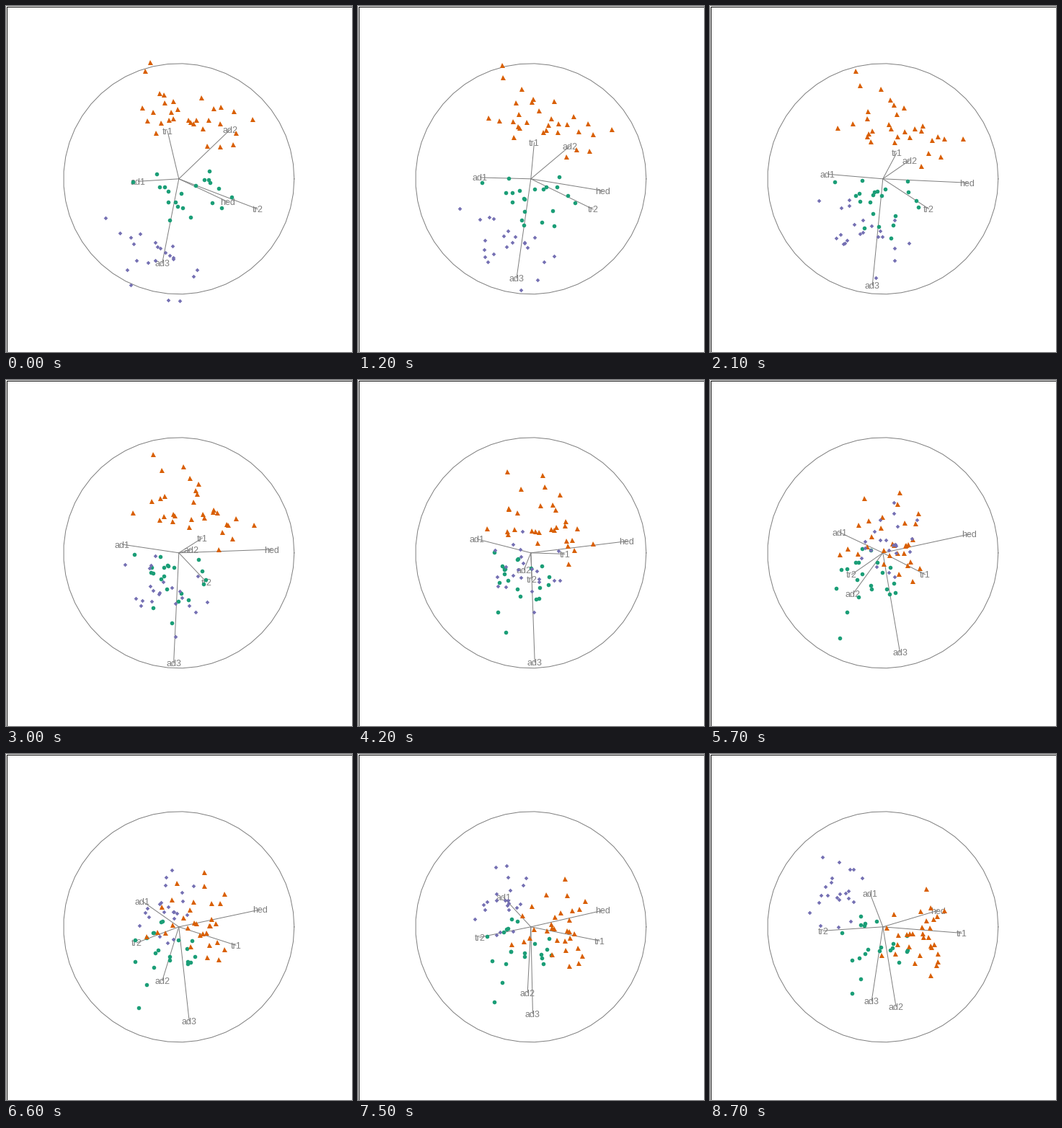
Animation, 480 px wide and 480 px high, one loop 9 s. Source, as a matplotlib script:

```python
import matplotlib.pyplot as plt
import numpy as np
from matplotlib.animation import FuncAnimation

SIZE, DPI = 480, 100
MID, RADIUS = 239.8, 160
UNIT = 230                      # pixels per unit of rescaled data
FRAMES, STEP = 30, 300
TURN = 19                       # the tour heads for a new plane here
PX = 72 / DPI
GREY = "#7f7f7f"
NAMES = ["tr1", "tr2", "hed", "ad1", "ad2", "ad3"]

# The tour's three planes: weights of each variable on x, then on y
START = [[-.10, .68, .42, -.35, .44, -.14], [.415, -.265, -.20, -.02, .425, -.73]]
MIDDLE = [[.365, -.27, .75, -.375, -.26, .144], [-.19, -.19, .165, .18, -.36, -.875]]
END = [[.68, -.515, .475, -.11, .11, -.10], [-.06, -.03, .14, .295, -.70, -.65]]

# Each species: count, colour, marker, size in pixels, mean of each variable
SPECIES = [
    (21, "#1b9e77", "o", 5.6, [.05, .14, .05, .28, .14, .16]),
    (31, "#d95f02", "^", 7.0, [.20, -.12, -.10, -.25, .17, -.24]),
    (22, "#7570b3", "D", 4.0, [-.33, .03, .08, .085, -.40, .19]),
]
SPREAD = [.10, .17, .16, .12, .12, .12]
CORR = 0.4

rng = np.random.default_rng(6)


def orthonormal(rows):
    u, _, vt = np.linalg.svd(rows, full_matrices=False)
    return u @ vt


def geodesic(a, b):
    """Constant-speed path of planes from a (t = 0) to b (t = 1)."""
    a, b = orthonormal(a), orthonormal(b)
    u, cosines, vt = np.linalg.svd(a @ b.T)
    angles = np.arccos(np.clip(cosines, -1, 1))[:, None]
    first, last = u.T @ a, vt @ b
    side = (last - np.cos(angles) * first) / np.sin(angles)
    return lambda t: u @ (np.cos(t * angles) * first + np.sin(t * angles) * side)


leg_1 = geodesic(START, MIDDLE)
leg_2 = geodesic(leg_1(1), END)


def plane(i):
    if i <= TURN:
        return leg_1(i / TURN)
    return leg_2((i - TURN) / (FRAMES - 1 - TURN))


def cloud(count, means):
    """Correlated 6-D sample, centred on the species means."""
    cov = (CORR + (1 - CORR) * np.eye(6)) * np.outer(SPREAD, SPREAD)
    noise = np.clip(rng.normal(size=(count, 6)), -2, 2)
    noise = (noise - noise.mean(0)) / noise.std(0)
    return means + noise @ np.linalg.cholesky(cov).T


def to_px(xy, scale):
    return MID + xy * [scale, -scale]


fig = plt.figure(figsize=(SIZE / DPI, SIZE / DPI), dpi=DPI, facecolor="white")
ax = fig.add_axes([0, 0, 1, 1])
ax.set_xlim(0, SIZE)
ax.set_ylim(SIZE, 0)
ax.axis("off")

ax.add_patch(plt.Rectangle((0.5, 0.5), SIZE - 1, SIZE - 1, fill=False,
                           ec="black", lw=PX))
turn = np.linspace(0, 2 * np.pi, 50)
ring = to_px(np.column_stack([np.cos(turn), np.sin(turn)]), RADIUS)
ax.plot(*ring.T, color=GREY, lw=PX)

spokes = [ax.plot([], [], color=GREY, lw=PX)[0] for _ in NAMES]
labels = [ax.text(0, 0, name, color=GREY, family="Liberation Sans",
                  size=12.5 * PX, ha="center", va="baseline", zorder=3)
          for name in NAMES]
clouds = []
for count, color, marker, size, means in SPECIES:
    dots, = ax.plot([], [], marker, color=color, ms=size * PX, mew=0, zorder=4)
    clouds.append((dots, cloud(count, means)))


def draw(i):
    view = plane(i)
    for spoke, label, (x, y) in zip(spokes, labels, to_px(view.T, RADIUS)):
        spoke.set_data([MID, x], [MID, y])
        label.set_position((x, y + 4.5))
    for dots, data in clouds:
        dots.set_data(*to_px(data @ view.T, UNIT).T)
    return spokes + labels + [dots for dots, _ in clouds]


anim = FuncAnimation(fig, draw, frames=FRAMES, interval=STEP, repeat=True,
                     repeat_delay=0, blit=False)
plt.show()
```
